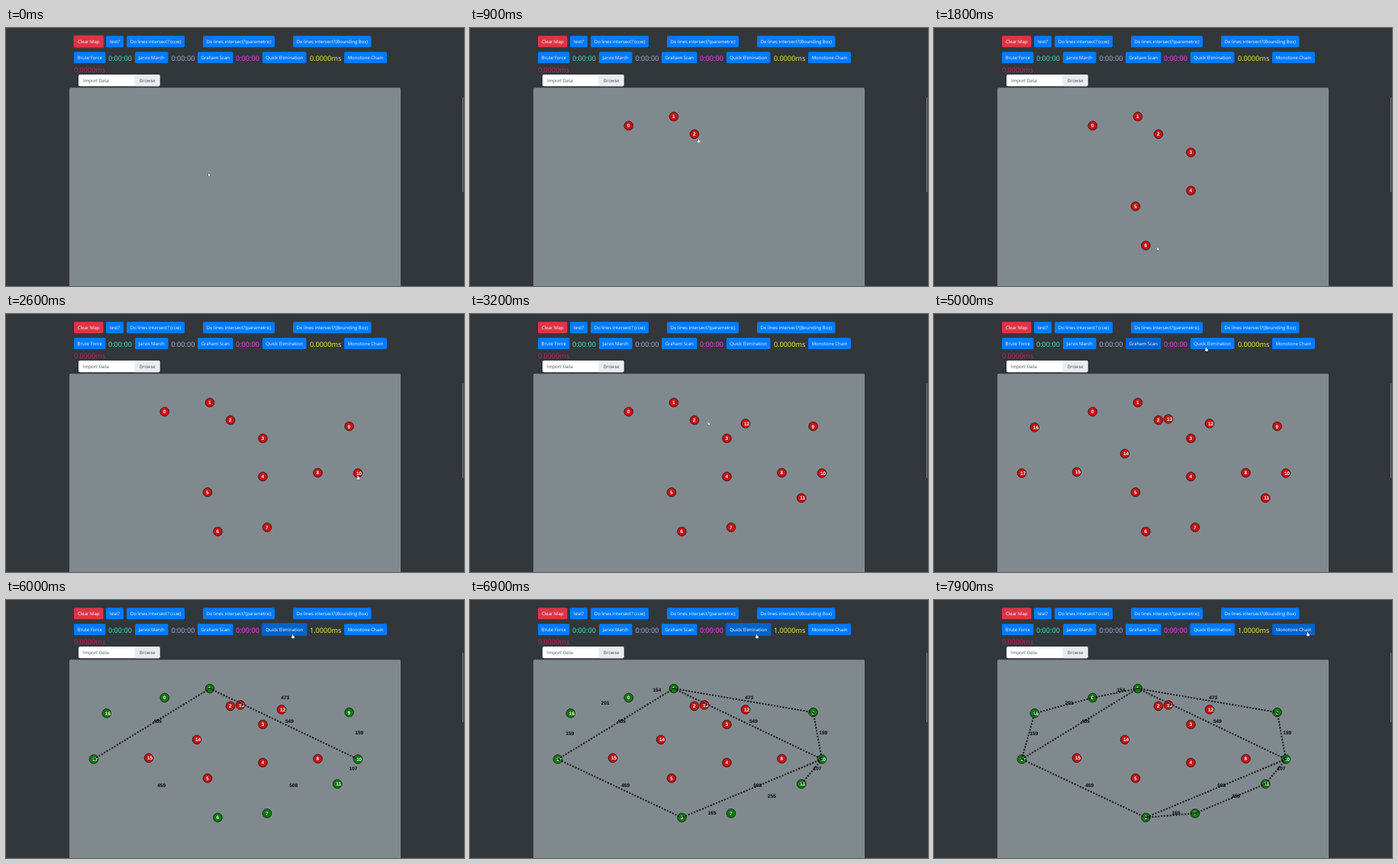
An HTML page with a canvas for the animation above (8000 ms loop, 600 by 338 pixels).

```html
<!DOCTYPE html>
<html lang="en">
<head>
<meta charset="utf-8">
<title>Convex hull</title>
<style>
  html, body { margin: 0; width: 100%; height: 100%; overflow: hidden; background: #32373b; }
  svg, canvas { position: absolute; left: 0; top: 0; width: 600px; height: 338px; }
  text { font-family: "Open Sans", "Noto Sans", sans-serif; font-size: 6px; white-space: pre;
    text-rendering: geometricPrecision; }
  .time { font-size: 9.1px; }
  rect { paint-order: stroke; stroke-width: 2.4px; }
</style>
</head>
<body>
<svg id="page" viewBox="0 0 600 338"></svg>
<canvas id="map"></canvas>
<script>
const LOOP = 8000, STEP = 100;
const FIRST = 360, PACE = 222;          // clicks that place the points
const SOLVE = 5350;                     // click on Quick Elimination
const UNITS = 2.558;                    // map units per pixel
const BLUE = '#007bff', HOVER = '#0064ce', RED = '#dc3545';
const page = document.getElementById('page');

function add(tag, attrs, text = '') {
  const el = document.createElementNS('http://www.w3.org/2000/svg', tag);
  for (const name in attrs) el.setAttribute(name, attrs[name]);
  el.textContent = text;
  return page.appendChild(el);
}
const box = (x, y, width, height, fill, rx = 1.6) => add('rect', { x, y, width, height, fill, rx });
const label = (text, x, y, fill) => add('text', { x, y, fill }, text);
const timer = (text, x, y, fill) => add('text', { x, y, fill, class: 'time' }, text);

function button(text, x, y, w, color = BLUE) {
  const rect = box(x, y, w, 14.9, color);
  add('text', { x: x + w / 2, y: y + 9.7, fill: '#fff', 'text-anchor': 'middle' }, text);
  return { rect, over: p => p.x > x && p.x < x + w && p.y > y && p.y < y + 14.9 };
}

const ROW1 = 10.3, ROW2 = 31.2, BASE = 43;
const clear = button('Clear Map', 89, ROW1, 38.5, RED);
button('test?', 131, ROW1, 23);
button('Do lines intersect? (ccw)', 158, ROW1, 76);
button('Do lines intersect?(parametric)', 258, ROW1, 94);
button('Do lines intersect?(Bounding Box)', 376, ROW1, 102.5);

button('Brute Force', 89, ROW2, 41.5);
timer('0:00:00', 134, BASE, '#48e8c4');
button('Jarvis March', 169, ROW2, 43.5);
timer('0:00:00', 216.5, BASE, '#aaaedb');
const graham = button('Graham Scan', 251, ROW2, 46.5);
timer('0:00:00', 301, BASE, '#ec4cec');
const quick = button('Quick Elimination', 336, ROW2, 57.5);
const quickTime = timer('0.0000ms', 398, BASE, '#f2f24e');
const chain = button('Monotone Chain', 443, ROW2, 56);
timer('0.0000ms', 89, 57.8, '#bd235e');

box(95, 61, 106.5, 15.2, '#fff');
box(168.5, 61, 33, 15.2, '#e9ecef');
label('Import Data', 101, 71.4, '#495057');
label('Browse', 175, 71.4, '#495057');
box(83, 78.3, 434, 270, '#808a8e');
const bar = box(598, 91, 1, 124, '#85888a', 0);

const canvas = document.getElementById('map');
const ratio = window.devicePixelRatio || 1;
canvas.width = 600 * ratio;
canvas.height = 338 * ratio;
const ctx = canvas.getContext('2d');
ctx.scale(ratio, ratio);

const points = [
  [207.8, 128], [267, 116], [294, 139], [336.5, 163], [336.5, 213], [264, 233.5],
  [277.5, 285], [342, 279.5], [408.5, 208], [449.6, 147.2], [461, 208.5], [434.2, 241],
  [361, 143.5], [307, 137.5], [250, 183], [187, 207], [131.8, 148.4], [115, 208.5]
].map(([x, y], i) => ({ x, y, born: FIRST + i * PACE }));

// The quadrilateral of extremes comes first, then the hull around it.
const links = list => list.slice(1).map((b, i) => [points[list[i]], points[b]]);
const edges = [[17, 1, 10, 6, 17], [1, 9, 10, 11, 7, 6], [17, 16, 0, 1]].flatMap(links);
const hull = new Set(edges.flat());

// Cursor stops: time, x, y
const stops = [
  [0, 265, 190],
  ...points.map(p => [p.born, p.x, p.y + 3]),
  [4870, 275, 43], [5000, 356.5, 43.5], [5300, 375.5, 45], [7000, 375.5, 45], [7700, 489.5, 42]
];

function cursorAt(t) {
  const last = stops.length - 1;
  const next = stops.findIndex(s => s[0] > t);
  const i = next < 0 ? last : Math.max(1, next);
  const [t0, x0, y0] = stops[i - 1], [t1, x1, y1] = stops[i];
  // rest after each click, move, rest before the next
  const u = Math.min(1, Math.max(0, ((t - t0) / (t1 - t0) - 0.3) / 0.6));
  const e = u * u * (3 - 2 * u);
  return { x: x0 + (x1 - x0) * e, y: y0 + (y1 - y0) * e };
}

function drawPoint(p, i, t) {
  if (t < p.born) return;
  const solved = t >= (p.y < 215 ? SOLVE : SOLVE + STEP);
  ctx.beginPath();
  ctx.arc(p.x, p.y, 5.85, 0, Math.PI * 2);
  ctx.fillStyle = hull.has(p) && solved ? '#067a0a' : '#c61216';
  ctx.fill();
  ctx.lineWidth = 0.7;
  ctx.strokeStyle = '#1c0a0a';
  ctx.stroke();
  ctx.fillStyle = '#fff';
  ctx.fillText(i, p.x - 2, p.y + 2.3);
}

function drawEdge([a, b], i, t) {
  if (t >= SOLVE + 60 + i * 85) {
    const length = Math.floor(Math.hypot(b.x - a.x, b.y - a.y) * UNITS);
    ctx.fillStyle = '#000';
    ctx.fillText(length, (a.x + b.x) / 2 + 2, (a.y + b.y) / 2 - 1.7);
  }
  if (t >= SOLVE + 350 + i * 190) {
    ctx.setLineDash([5 / UNITS, 5 / UNITS]);
    ctx.lineWidth = 5 / UNITS;
    ctx.strokeStyle = '#0b0b0b';
    ctx.beginPath();
    ctx.moveTo(a.x, a.y);
    ctx.lineTo(b.x, b.y);
    ctx.stroke();
    ctx.setLineDash([]);
  }
}

const ARROW = new Path2D('M0 0V4.6L1 3.7L1.7 5.2L2.4 4.9L1.7 3.4H3.1Z');
const HAND = new Path2D('M-.6 .4Q0 -.4 .5 .4V2L2.1 2.5Q2.6 2.7 2.5 3.4L2 5.2H-.4L-1.8 3.4Q-1.5 2.6 -.6 3.2Z');

function drawCursor({ x, y }, hand) {
  const shape = hand ? HAND : ARROW;
  ctx.save();
  ctx.translate(x, y);
  ctx.lineWidth = 0.6;
  ctx.strokeStyle = '#222';
  ctx.stroke(shape);
  ctx.fillStyle = '#fff';
  ctx.fill(shape);
  ctx.restore();
}

const ring = (b, on, color) => b.rect.setAttribute('stroke', on ? color : 'none');

function draw(t) {
  const cursor = cursorAt(t), before = cursorAt(Math.max(0, t - STEP));
  const solved = t >= SOLVE;
  const targets = [graham, quick, chain];

  ring(clear, t < FIRST, 'rgba(220,53,69,.5)');
  ring(quick, solved, 'rgba(0,123,255,.5)');
  // the hover colour trails the cursor slightly
  for (const b of targets) b.rect.setAttribute('fill', b.over(before) ? HOVER : BLUE);
  quickTime.textContent = solved ? '1.0000ms' : '0.0000ms';
  bar.setAttribute('y', solved ? 69 : 91);
  bar.setAttribute('height', solved ? 91 : 124);

  ctx.clearRect(0, 0, 600, 338);
  ctx.font = 'bold 6.5px "Liberation Sans", Arial, sans-serif';
  ctx.textRendering = 'geometricPrecision';
  points.forEach((p, i) => drawPoint(p, i, t));
  edges.forEach((e, i) => drawEdge(e, i, t));

  const near = points.some(p => t >= p.born && Math.hypot(p.x - cursor.x, p.y - cursor.y) < 9);
  drawCursor(cursor, near || targets.some(b => b.over(cursor)));
}

const start = performance.now();
function frame(now) {
  const t = Math.max(0, now - start) % LOOP;
  draw(Math.floor(t / STEP) * STEP);
  requestAnimationFrame(frame);
}
draw(0);
requestAnimationFrame(frame);
</script>
</body>
</html>
```
